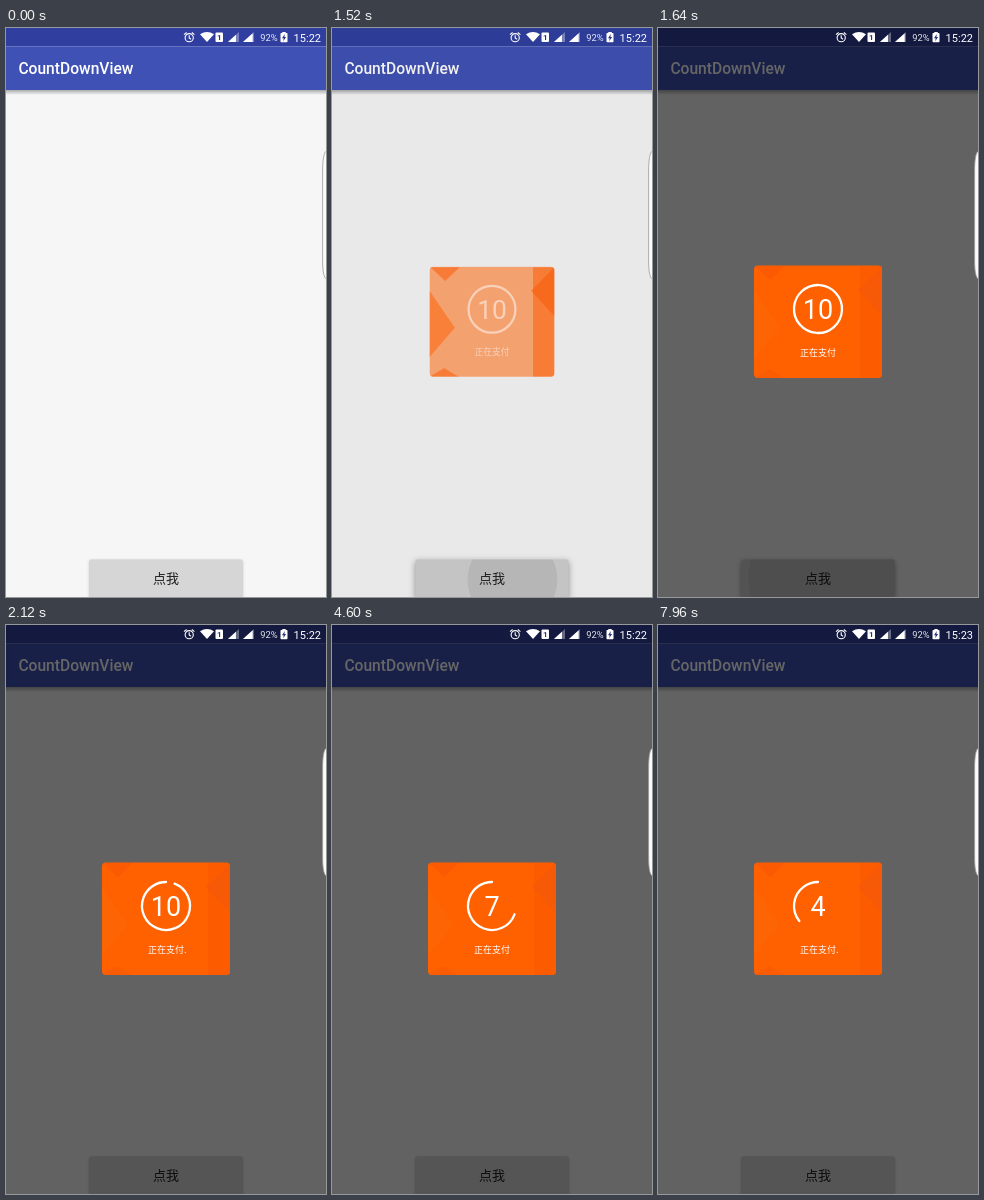
These frames come from a looping animation (320x569 px, 8000 ms). An HTML page with a canvas:

```html
<!DOCTYPE html>
<html lang="zh">
<head>
<meta charset="utf-8">
<title>CountDownView</title>
<style>
html, body { margin: 0; width: 100%; height: 100%; overflow: hidden; background: #f6f6f6; }
canvas { display: block; width: 320px; height: 569px; }
</style>
</head>
<body>
<canvas id="stage"></canvas>
<script>
const W = 320, H = 569, LOOP = 8000;
const COUNT_START = 1540, COUNT_MS = 10000, DOT_MS = 375;
const RIPPLE_START = 1420, RIPPLE_MS = 300;
const MINUTE_AT = 7400;
const SANS = 'Roboto, sans-serif';
const CJK = '"Noto Sans CJK SC", "Noto Sans CJK", sans-serif';

const canvas = document.getElementById('stage');
const c = canvas.getContext('2d');
const dpr = window.devicePixelRatio || 1;
canvas.width = W * dpr;
canvas.height = H * dpr;

const clamp = v => Math.max(0, Math.min(1, v));
const span = (t, from, to) => clamp((t - from) / (to - from));
const easeOut = p => 1 - (1 - p) * (1 - p);
const mix = (a, b, p) => a + (b - a) * p;

function rect(x, y, w, h, color) {
  c.fillStyle = color;
  c.fillRect(x, y, w, h);
}

function roundRect(x, y, w, h, r) {
  c.beginPath();
  c.moveTo(x + r, y);
  c.arcTo(x + w, y, x + w, y + h, r);
  c.arcTo(x + w, y + h, x, y + h, r);
  c.arcTo(x, y + h, x, y, r);
  c.arcTo(x, y, x + w, y, r);
  c.closePath();
}

function poly(color, ...pts) {
  c.beginPath();
  for (let i = 0; i < pts.length; i += 2) c.lineTo(pts[i], pts[i + 1]);
  c.closePath();
  c.fillStyle = color;
  c.fill();
}

function text(str, x, y, font, color, align = 'left') {
  c.font = font;
  c.fillStyle = color;
  c.textAlign = align;
  c.fillText(str, x, y);
}

function drawBars() {
  rect(0, 0, W, H, '#f6f6f6');
  const shade = c.createLinearGradient(0, 62, 0, 67);
  shade.addColorStop(0, 'rgba(0,0,0,.3)');
  shade.addColorStop(1, 'rgba(0,0,0,0)');
  rect(0, 62, W, 5, shade);
  rect(0, 0, W, 18.5, '#303f9f');
  rect(0, 18.5, W, 43.5, '#3f51b5');
  text('CountDownView', 12.4, 46.3, '500 15.6px ' + SANS, '#fff');
}

function drawButton(t) {
  const fade = 1 - span(t, 1600, 1860);
  const press = span(t, 1400, 1470) * fade;
  c.save();
  c.shadowColor = `rgba(0,0,0,${mix(0.28, 0.4, press)})`;
  c.shadowBlur = mix(2.5, 6, press) * dpr;
  c.shadowOffsetY = mix(1, 2, press) * dpr;
  roundRect(83.5, 531.5, 153, 38, 1.5);
  c.fillStyle = '#d6d6d6';
  c.fill();
  c.restore();

  if (press > 0) {
    c.save();
    roundRect(83.5, 531.5, 153, 38, 1.5);
    c.clip();
    rect(83, 531, 154, 39, `rgba(0,0,0,${0.03 * press})`);
    const p = easeOut(span(t, RIPPLE_START, RIPPLE_START + RIPPLE_MS));
    c.beginPath();
    c.arc(mix(204, 162, p), mix(554, 550, p), 80 * p, 0, 7);
    c.fillStyle = `rgba(0,0,0,${0.075 * fade})`;
    c.fill();
    c.restore();
  }
  text('点我', 160, 555, '500 13px ' + CJK, '#1c1c1c', 'center');
}

function drawEdgePanel() {
  c.beginPath();
  c.moveTo(321, 122.5);
  c.bezierCurveTo(317.6, 124, 316.6, 132, 316.6, 144);
  c.lineTo(316.6, 231);
  c.bezierCurveTo(316.6, 243, 317.6, 250, 321, 251.5);
  c.closePath();
  c.fillStyle = '#fbfbfb';
  c.fill();
  c.strokeStyle = '#9a9a9a';
  c.lineWidth = 0.8;
  c.stroke();
}

function drawSignal(x, level) {
  poly('rgba(255,255,255,.35)', x, 14, x + 11, 14, x + 11, 4);
  const w = 11 * level;
  poly('#fff', x, 14, x + w, 14, x + w, 14 - 10 * level);
}

function drawStatus(t) {
  c.strokeStyle = '#fff';
  c.lineWidth = 1.1;
  c.beginPath();
  c.arc(183.2, 9.7, 4.1, 0, 7);
  c.moveTo(183.2, 7.2);
  c.lineTo(183.2, 10);
  c.lineTo(185, 11.2);
  c.moveTo(178, 6.6);
  c.lineTo(180.6, 4.5);
  c.moveTo(185.8, 4.5);
  c.lineTo(188.4, 6.6);
  c.stroke();

  c.beginPath();
  c.moveTo(201, 14);
  c.lineTo(194, 6.3);
  c.quadraticCurveTo(201, 1.9, 208, 6.3);
  c.closePath();
  c.fillStyle = '#fff';
  c.fill();

  roundRect(209.5, 4.5, 7.5, 9.5, 1);
  c.fill();
  text('1', 213.2, 12.2, '700 8px ' + SANS, '#26327f', 'center');

  drawSignal(222, 0.72);
  drawSignal(237, 0.88);
  text('92%', 254.3, 13, '9.4px ' + SANS, 'rgba(255,255,255,.88)');

  rect(276.3, 4, 3.4, 1.5, '#fff');
  roundRect(274.5, 5, 7, 9.3, 0.7);
  c.fillStyle = '#fff';
  c.fill();
  poly('#26327f', 278.8, 6, 276, 10.2, 277.7, 10.2, 277.2, 13.2, 280.1, 8.9, 278.4, 8.9);

  text(t < MINUTE_AT ? '15:22' : '15:23', 287.6, 13.6, '11px ' + SANS, '#fff');
}

function drawDialog(t) {
  const show = span(t, 1490, 1550);
  if (!show) return;
  const size = mix(0.9, 1, easeOut(show));
  c.save();
  c.globalAlpha = show;
  c.translate(160, 294);
  c.scale(size, size);
  c.translate(-160, -294);

  c.save();
  roundRect(96, 237.5, 128, 112.5, 4);
  c.clip();
  rect(96, 237, 128, 114, '#ff6000');
  poly('#fb5a02', 97, 238, 127, 238, 112, 252);
  poly('#fa5c04', 96, 350, 126, 350, 111, 341);
  poly('#fc5b00', 202, 238, 224, 238, 224, 350, 202, 350);
  poly('#f75a06', 200, 262, 224, 238, 224, 288);
  poly('#fd6404', 96, 262, 122, 300, 96, 330);
  c.restore();

  const done = clamp((t - COUNT_START) / COUNT_MS);
  const top = -Math.PI / 2;
  c.beginPath();
  c.arc(160, 281, 24, top + done * 2 * Math.PI, top + 2 * Math.PI);
  c.strokeStyle = '#fff';
  c.lineWidth = 2.3;
  c.lineCap = 'round';
  c.stroke();
  c.lineCap = 'butt';

  text(Math.ceil(10 - done * 10), 160, 290.6, '27px ' + SANS, '#fff', 'center');
  const dots = Math.floor(Math.max(0, t - COUNT_START) / DOT_MS) % 4;
  text('正在支付' + '.'.repeat(dots), 142, 327.5, '9px ' + CJK, '#fff');
  c.restore();
}

function draw(t) {
  c.setTransform(dpr, 0, 0, dpr, 0, 0);
  drawBars();
  drawButton(t);
  rect(0, 0, W, H, `rgba(0,0,0,${0.6 * span(t, 1510, 1630)})`);
  drawEdgePanel();
  drawStatus(t);
  drawDialog(t);
}

const start = performance.now();
function tick() {
  draw((performance.now() - start) % LOOP);
  requestAnimationFrame(tick);
}
tick();
</script>
</body>
</html>
```
